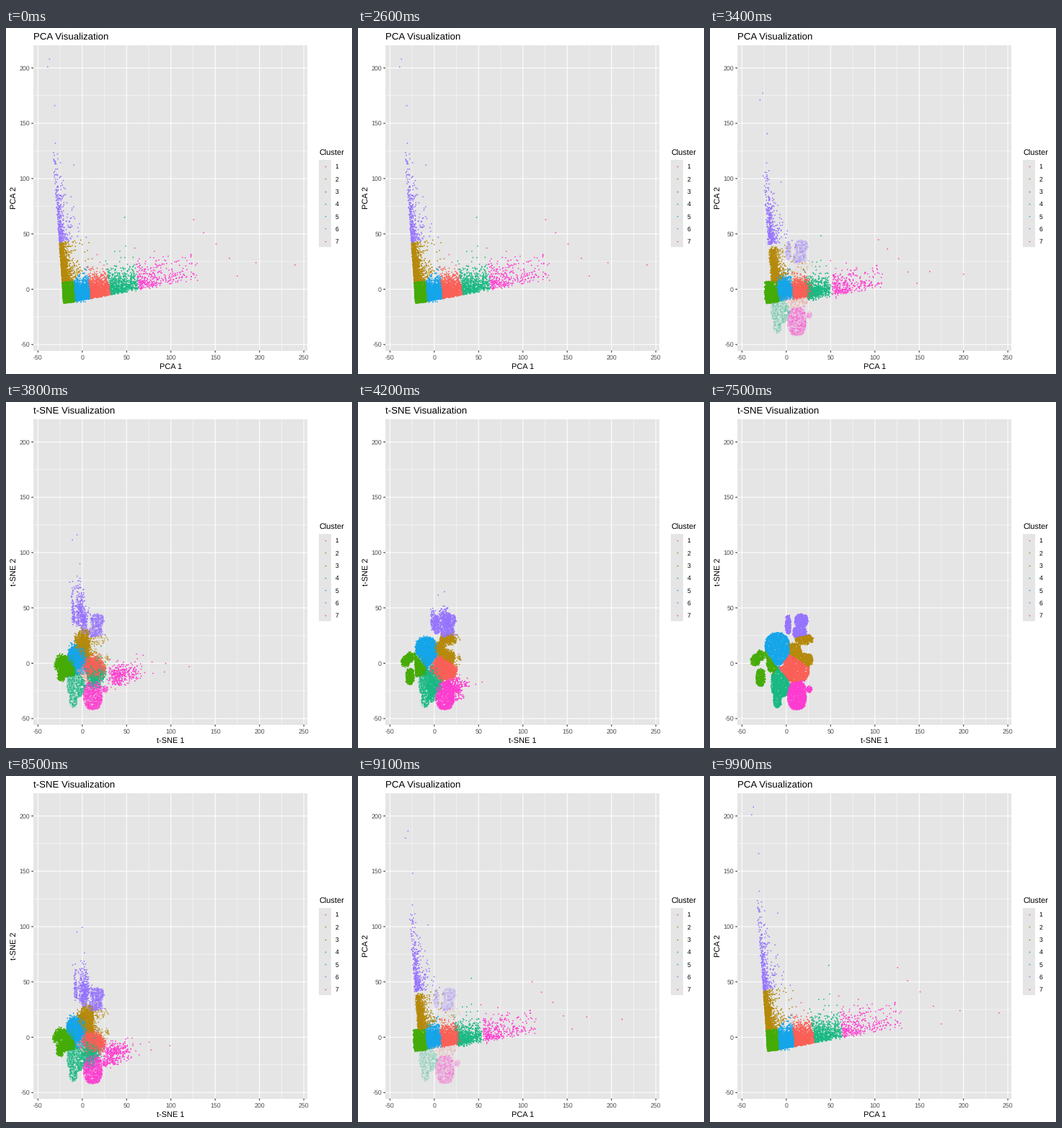
Recreate the animation shown at these times as a matplotlib script. Size 480x480 px, loop 10 s.

```python
import numpy as np
import matplotlib.pyplot as plt
from matplotlib.animation import FuncAnimation
from matplotlib.colors import to_rgb
from matplotlib.patches import Rectangle

plt.rcParams["font.family"] = "Liberation Sans"
plt.rcParams["text.hinting"] = "none"
rng = np.random.default_rng(7)

SIZE, FRAMES, INTERVAL = 480, 100, 100
N = 10000
DOT = 1.75
LEFT, RIGHT, TOP, BOTTOM = 38, 418, 24, 447.5
COLORS = ["#FB5F56", "#B5890A", "#45AB06", "#18B982",
          "#14A5EA", "#9673FF", "#FF3BD0"]

# Cluster centres; every point takes the colour of the nearest one.
PCA_CENTERS = np.array([(17.5, -2.5), (-20, 20), (-17, -6), (45, 3.5),
                        (0, -4.5), (-25, 65), (81, 8.5)])
TSNE_CENTERS = np.array([(8, -5), (17, 12), (-26, -2), (-8, -21),
                         (-10, 12), (13, 36), (12, -29)])

# Farthest points, and where the first three of them travel to.
PCA_FAR = [(240, 22), (-37, 208), (-39, 201), (-31, 166), (48, 65),
           (137, 51), (151, 41), (166, 28), (196, 24), (175, 12)]
TSNE_FAR = [(26, -23), (19, 43), (11, 40.5)]

# Rounded blobs that make up the t-SNE map: cx, cy, rx, ry.
BLOBS = [(-10, 13, 14, 14.5), (11, -6, 15, 11), (9, 9, 8, 9), (20, 3, 10, 6),
         (-7, -17, 10, 14), (-10, -31, 4.5, 9), (12, -29, 10.5, 13),
         (26, -23.5, 3, 3), (20, 21.5, 10, 4.5), (-16, 0, 6, 8),
         (-35, 3, 5, 5), (-29, 7, 4.5, 4.5), (-29, -13, 5, 8),
         (2, 35, 3, 8.5), (17, 38.5, 7.5, 6), (15, 28, 7.5, 5.5)]


def px(x):
    return 105.8 + 1.2295 * np.asarray(x)


def py(y):
    return 362.4 - 1.535 * np.asarray(y)


def left_edge(y):
    return -21 - 0.095 * (y + 13)


def pca_points():
    """Two arms of an L: a wide horizontal one and a thin vertical one."""
    n = int(N * 0.72)
    u = rng.exponential(28, n) % 155
    y = -13 + 0.135 * u + rng.gamma(2, 3.1 + 0.02 * u)
    wide = np.c_[left_edge(y) + u, y]

    n = N - n - len(PCA_FAR)
    y = -12 + rng.exponential(28, n) % 145
    spread = np.where(rng.random(n) < 0.25, 5, 1.9)
    tall = np.c_[left_edge(y) + rng.gamma(1.8, spread), y]
    return np.r_[PCA_FAR, rng.permutation(np.r_[wide, tall])]


def tsne_points():
    p = rng.uniform((-42, -45), (32, 47), (45000, 2))
    inside = np.zeros(len(p), bool)
    for cx, cy, rx, ry in BLOBS:
        d = np.abs((p - (cx, cy)) / (rx, ry))
        inside |= (d ** 2.6).sum(1) < 1
    p = p[inside][:N - len(TSNE_FAR)]
    return np.r_[TSNE_FAR, p + rng.normal(0, 0.35, p.shape)]


def nearest(points, centers):
    return ((points[:, None] - centers) ** 2).sum(-1).argmin(1)


def build():
    """Pair points cluster by cluster; surplus points stay put and fade."""
    pca, tsne = pca_points(), tsne_points()
    pca_id, tsne_id = nearest(pca, PCA_CENTERS), nearest(tsne, TSNE_CENTERS)
    start, end, kind, rgb = [], [], [], []
    for c, color in enumerate(COLORS):
        a, b = pca[pca_id == c], tsne[tsne_id == c]
        k = min(len(a), len(b))
        start += [a, b[k:]]
        end += [b[:k], a[k:], b[k:]]
        kind += [0] * k + [-1] * (len(a) - k) + [1] * (len(b) - k)
        rgb += [to_rgb(color)] * max(len(a), len(b))
    order = rng.permutation(len(kind))
    return [np.array(v)[order] for v in
            (np.concatenate(start), np.concatenate(end), kind, rgb)]


def ease(t):
    return 4 * t ** 3 if t < 0.5 else 1 - 4 * (1 - t) ** 3


def progress(i):
    """0 is the PCA layout, 1 the t-SNE layout."""
    if i <= 50:
        return ease(max(0, i - 25) / 25)
    return 1 - ease(max(0, i - 74) / 25)


fig = plt.figure(figsize=(SIZE / 72, SIZE / 72), dpi=72, facecolor="white")
ax = fig.add_axes([0, 0, 1, 1])
ax.set_xlim(0, SIZE)
ax.set_ylim(SIZE, 0)
ax.axis("off")


def box(x0, y0, x1, y1):
    ax.add_patch(Rectangle((x0, y0), x1 - x0, y1 - y0, fc="#E5E5E5", lw=0))


def line(xs, ys, color, width, z):
    ax.plot(xs, ys, color=color, lw=width, zorder=z,
            solid_capstyle="butt", snap=False)


def label(x, y, s, size, color="black", **kw):
    return ax.text(x, y, s, fontsize=size, color=color, va="baseline", **kw)


box(LEFT, TOP, RIGHT, BOTTOM)
for v in range(-50, 251, 25):
    major = v % 50 == 0
    width, z = (1.07, 2) if major else (0.53, 1)
    line([px(v)] * 2, [TOP, BOTTOM], "white", width, z)
    if major:
        line([px(v)] * 2, [BOTTOM, BOTTOM + 2.75], "#333333", 1.07, 2)
        label(px(v), 460, str(v), 8.8, "#4D4D4D", ha="center")
    if v <= 200:
        line([LEFT, RIGHT], [py(v)] * 2, "white", width, z)
        if major:
            line([LEFT - 2.75, LEFT], [py(v)] * 2, "#333333", 1.07, 2)
            label(33, py(v) + 3.2, str(v), 8.8, "#4D4D4D", ha="right")

label(434, 177, "Cluster", 11)
box(434, 183, 451.3, 304)
for k, color in enumerate(COLORS):
    y = 192 + 17.28 * k
    ax.scatter([442.7], [y], s=DOT ** 2, c=color, lw=0, zorder=3)
    label(456.4, y + 3.4, str(k + 1), 8.8)

title = label(38, 16.2, "", 13.2)
xlabel = label(228.2, 473, "", 11, ha="center")
ylabel = label(13.6, 235.6, "", 11, ha="center", rotation=90,
               rotation_mode="anchor")

start, end, kind, rgb = build()
start = np.c_[px(start[:, 0]), py(start[:, 1])]
end = np.c_[px(end[:, 0]), py(end[:, 1])]
dots = ax.scatter(*start.T, s=DOT ** 2, c=rgb, lw=0, zorder=3)


def draw(i):
    s = progress(i)
    alpha = np.choose(kind + 1, [1 - s, 1.0, s])
    dots.set_offsets(start + (end - start) * s)
    dots.set_facecolor(np.c_[rgb, alpha])
    name = "t-SNE" if 37 <= i < 86 else "PCA"
    title.set_text(f"{name} Visualization")
    xlabel.set_text(f"{name} 1")
    ylabel.set_text(f"{name} 2")
    return dots, title, xlabel, ylabel


anim = FuncAnimation(fig, draw, frames=FRAMES, interval=INTERVAL,
                     repeat=True, repeat_delay=0, blit=False)
plt.show()
```
